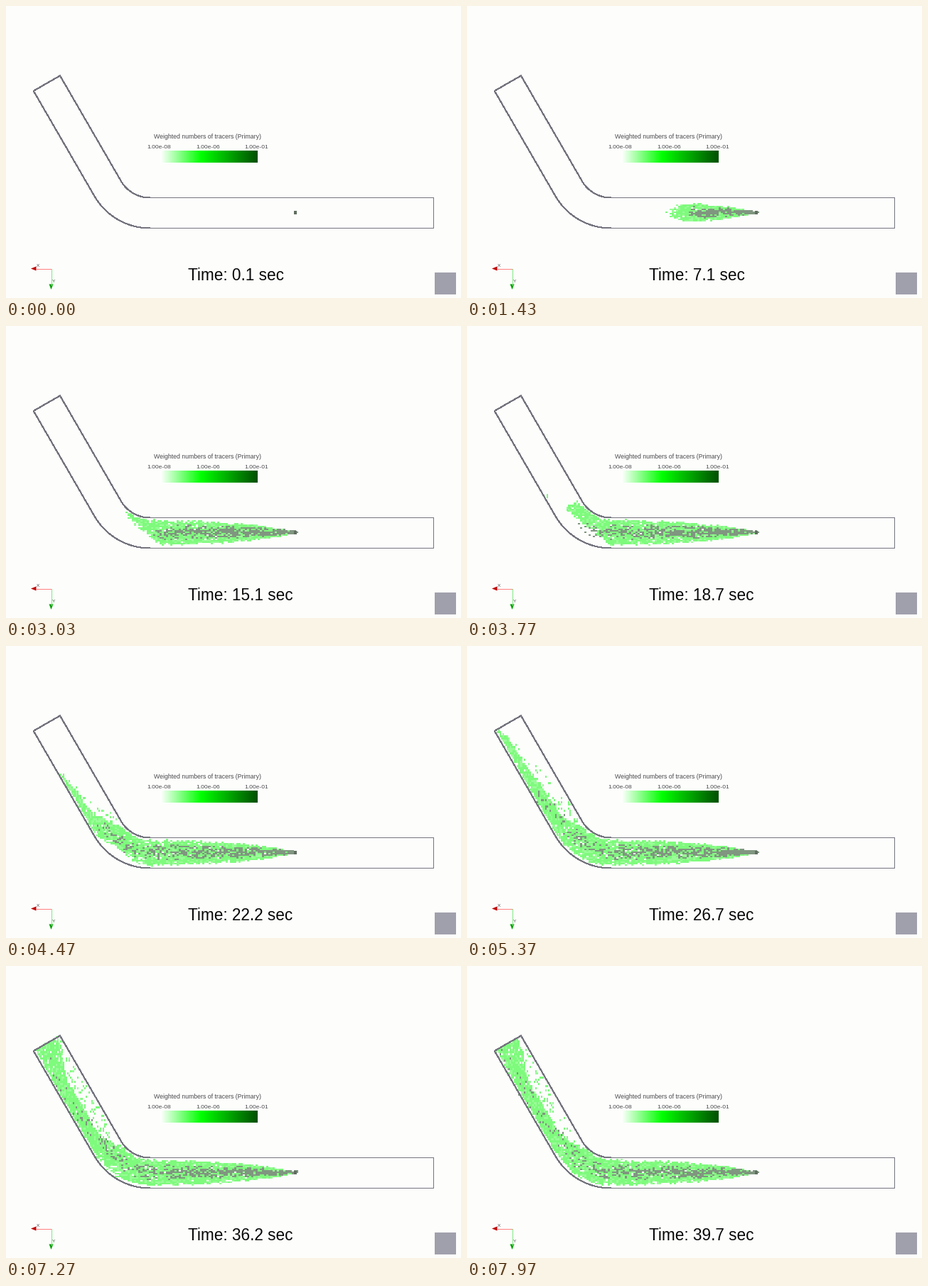
Write a matplotlib script that moves like this. It is 640 by 412 pixels and loops after 8 s.

```python
import numpy as np
import matplotlib.pyplot as plt
from matplotlib.animation import FuncAnimation
from matplotlib.colors import LinearSegmentedColormap

W, H, DPI = 640, 412, 100
TICK, LOOP = 20, 8000
STEP_MS = 1000 / 30
PX = 72 / DPI
BG, LINE, INK = "#fdfdfc", "#74747e", "#4c4c50"
plt.rcParams["font.family"] = "Liberation Sans"

# channel: straight reach, 60 degree bend, inclined reach
CX, CY, R_MID, HALF = 202.5, 223.5, 68.5, 21.5
BEND = np.pi / 3
STRAIGHT, LEG = 204.5, 171.7
LEG_START = STRAIGHT + R_MID * BEND
LENGTH = LEG_START + LEG

# plume speeds in px/s: leading edge, cell drift, dense core
FRONT, DRIFT, CORE_FRONT = 16.8, 14.0, 13.0


def smooth(u, a, b):
    s = np.clip((u - a) / (b - a), 0, 1)
    return s * s * (3 - 2 * s)


def to_xy(u, n):
    """Distance u downstream of the release point and offset n to stage pixels."""
    phi = np.clip((u - STRAIGHT) / R_MID, 0, BEND)
    pre = np.minimum(u, STRAIGHT) - STRAIGHT
    post = np.maximum(u - LEG_START, 0)
    r = R_MID + n
    x = CX - r * np.sin(phi) - pre - post * np.cos(BEND)
    y = CY + r * np.cos(phi) - post * np.sin(BEND)
    return x, y


def lag(u, q):
    """Delay in seconds behind the front; q runs from inner (-1) to outer (1) edge."""
    edge = 0.02 * u * q**2 * (1 - smooth(u, 150, 220))
    outer_bend = 13 * ((1 + q) / 2) ** 1.5 * np.exp(-(((u - 240) / 40) ** 2))
    inner_leg = 9 * ((1 - q) / 2) ** 1.5 * smooth(u, 260, 320)
    return edge + outer_bend + inner_leg


rng = np.random.default_rng(7)
N_LIGHT, N_CORE = 6500, 1150
light_u = rng.uniform(0, LENGTH, N_LIGHT)
light_q = rng.uniform(-1, 1, N_LIGHT) * (1 - 0.18 * rng.random(N_LIGHT))
light_late = rng.normal(0, 0.25, N_LIGHT)
stray = rng.random(N_LIGHT) < 0.06
SHADES = np.array([[126, 250, 124, 255], [154, 251, 152, 255]], np.uint8)
light_rgba = SHADES[(rng.random(N_LIGHT) < 0.25).astype(int)]

core_u = rng.uniform(0, LENGTH, N_CORE)
core_g = np.clip(rng.normal(0, 1, N_CORE), -1.8, 1.8)
core_late = rng.normal(0, 0.3, N_CORE)
core_rank = rng.random(N_CORE)
CORE_RGBA = (128, 150, 128, 255)


def stamp(img, u, n, rgba):
    """Paint grid cells, 3x2 px, upright in the inclined reach."""
    x, y = to_xy(u, n)
    upright = u > LEG_START
    w, h = np.where(upright, 2, 3), np.where(upright, 3, 2)
    x = (np.floor(x / w) * w).astype(int)
    y = (np.floor(y / h) * h).astype(int)
    for a in range(3):
        for b in range(2):
            img[y + np.where(upright, a, b), x + np.where(upright, b, a)] = rgba


def plume(t):
    img = np.zeros((H, W, 4), np.uint8)

    # pale cells: widening plume that leaves the inner wall after the bend
    u = (light_u + DRIFT * t) % LENGTH
    on = u / FRONT + lag(u, light_q) + light_late * np.minimum(u / 20, 1) < t
    wide = 20 * (1 - np.exp(-u / 75))
    gap = 21 * smooth(u, 258, 305) - 18 * smooth(u, 385, 446)
    top = -wide + np.where(stray, 0, gap)
    n = (top + wide) / 2 + light_q * (wide - top) / 2 - 0.5
    stamp(img, u[on], n[on], light_rgba[on])

    # dense core, thinning out downstream
    u = (core_u + DRIFT * t) % LENGTH
    on = u / CORE_FRONT + core_late * np.minimum(u / 20, 1) < t
    on &= core_rank < 1 / (1 + (u / 200) ** 4)
    n = -1 + 14 * smooth(u, 265, 350) + core_g * (0.6 + 5 * (1 - np.exp(-u / 70)))
    stamp(img, u[on] - 2, n[on], CORE_RGBA)

    img[289:294, 405:409] = (96, 110, 96, 255)
    return img


def clock(step):
    return max(0.1, round(step / 6 - 0.1, 1))


fig = plt.figure(figsize=(W / DPI, H / DPI), dpi=DPI, facecolor=BG)
ax = fig.add_axes([0, 0, 1, 1])
ax.axis("off")


def label(x, y, s, px, color=INK, **kw):
    return ax.text(x, y, s, fontsize=px * PX, color=color, **kw)


cloud = ax.imshow(plume(0.1), extent=(0, W, H, 0), interpolation="nearest", zorder=1)

# channel outline
s = np.concatenate([[407 - 601.5], np.linspace(STRAIGHT, LEG_START, 40), [LENGTH]])
x_in, y_in = to_xy(s, -HALF)
x_out, y_out = to_xy(s, HALF)
ax.fill(np.append(x_in, x_out[::-1]), np.append(y_in, y_out[::-1]),
        fill=False, ec=LINE, lw=PX, antialiased=False, zorder=2)

# colour bar
cmap = LinearSegmentedColormap.from_list(
    "tracer", [(0, "#ffffff"), (0.42, "#00ff00"), (1, "#005000")])
ax.imshow(np.linspace(0, 1, 137)[None, :], cmap=cmap, extent=(217, 354, 221, 204),
          aspect="auto", zorder=2)
label(284, 187, "Weighted numbers of tracers (Primary)", 8.8, ha="center")
for x, text in ((215, "1.00e-08"), (284, "1.00e-06"), (352.5, "1.00e-01")):
    label(x, 200.5, text, 8.5, ha="center")

# axis triad
ax.plot([63.5, 42], [370.5, 370.5], color="#ff8080", lw=PX)
ax.plot([63.5, 63.5], [370.5, 394], color="#80e880", lw=PX)
ax.fill([35, 42.5, 42.5], [370.5, 367.5, 373.5], color="#c00000", lw=0)
ax.fill([63.5, 60.5, 66.5], [400, 392.5, 392.5], color="#00a000", lw=0)
label(42.5, 368, "X", 6.5)
label(65, 390, "Y", 6.5)

# emblem placeholder
ax.add_patch(plt.Rectangle((603, 376), 30, 31, color="#a0a0ac", lw=0))

time_text = label(255.5, 387, "", 22.6, "#080808")
ax.set_xlim(0, W)
ax.set_ylim(H, 0)
ax.set_aspect("auto")


def draw(tick):
    t = clock(round(tick * TICK / STEP_MS))
    cloud.set_data(plume(t))
    time_text.set_text(f"Time: {t:.1f} sec")
    return cloud, time_text


anim = FuncAnimation(fig, draw, frames=LOOP // TICK, interval=TICK,
                     init_func=lambda: draw(0), repeat=True, repeat_delay=0)
plt.show()
```
